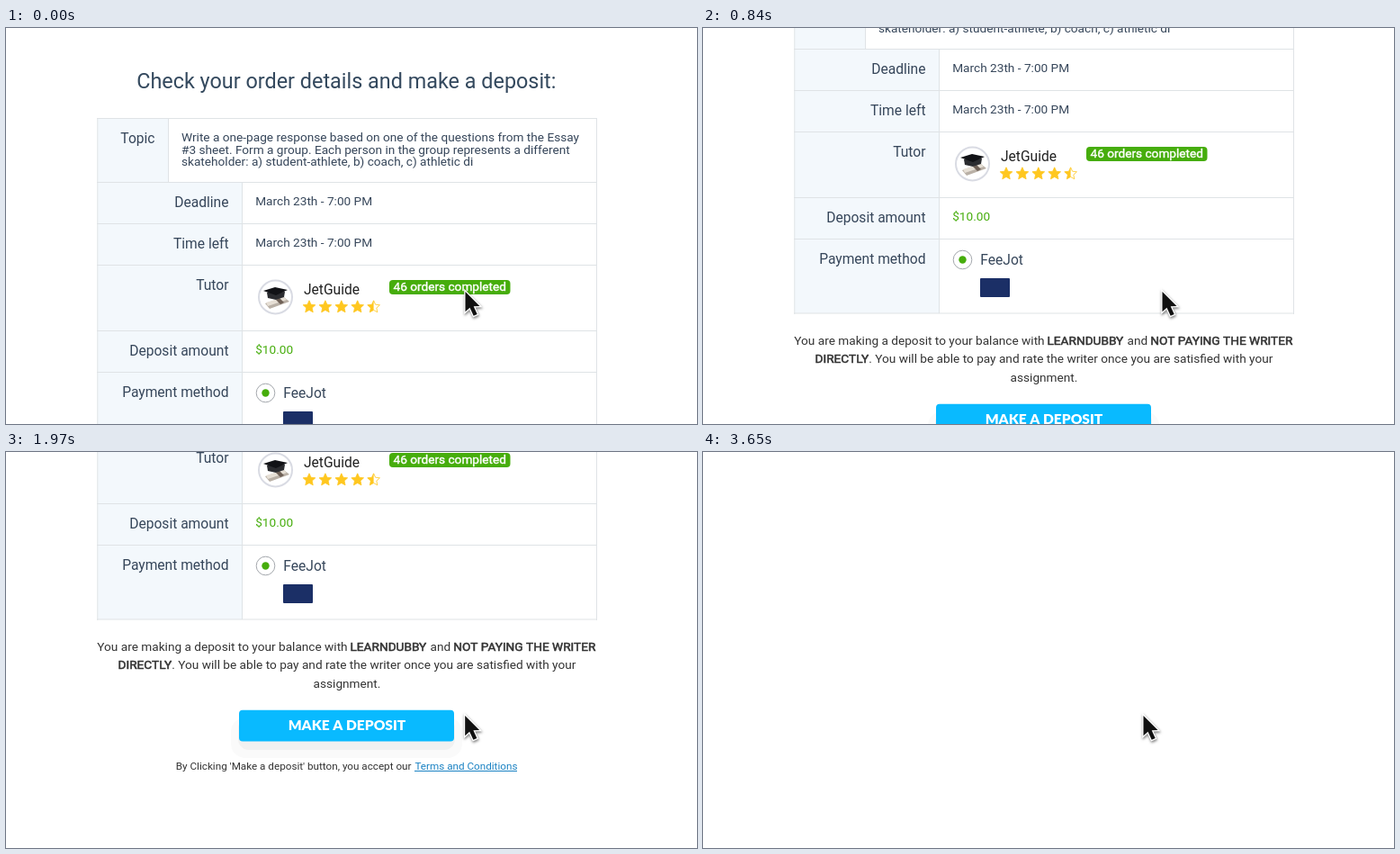
Recreate the animation shown at these times as an HTML page with a canvas. Size 768 px wide and 440 px high, loop 4.06 s.

```html
<!DOCTYPE html>
<html lang="en">
<head>
<meta charset="utf-8">
<title>Order deposit</title>
<style>
html, body { margin: 0; width: 100%; height: 100%; overflow: hidden; background: #fff; }
canvas { display: block; width: 768px; height: 440px; }
</style>
</head>
<body>
<canvas id="stage" width="768" height="440"></canvas>
<script>
const W = 768, H = 440, LOOP = 4060, TICK = 30, SCROLL = 279;
const ctx = document.getElementById('stage').getContext('2d');

const INK = '#36465a', DARK = '#333', GREEN = '#46ad0c', LINE = '#dfe3e6', CELL = '#f3f8fc';
// All page type is set on a 0.975 zoom.
const type = (px, family = 'Roboto', weight = 400) => `${weight} ${px * 0.975}px ${family}, sans-serif`;
const TITLE = type(24), LABEL = type(16), BODY = type(14), SMALL = type(12);
const BUTTON = type(16, 'Lato', 900), STEP = '400 30px Roboto, sans-serif';

// Progress 0..1 in n equal ticks, the first one taken at the start time.
function ramp(t, start, n) {
  const k = Math.floor((t - start) / TICK) + 1;
  return Math.max(0, Math.min(1, k / n));
}
const ease = p => p * p * (3 - 2 * p);

// Baselines sit on whole pixels.
function text(str, x, y, font, color, align = 'left', bold = 0) {
  y = Math.round(y);
  ctx.font = font;
  ctx.textAlign = align;
  ctx.fillStyle = color;
  ctx.fillText(str, x, y);
  if (bold) {
    ctx.strokeStyle = color;
    ctx.lineWidth = bold;
    ctx.lineJoin = 'round';
    ctx.strokeText(str, x, y);
  }
}

function box(x, y, w, h, color, r = 0) {
  ctx.fillStyle = color;
  ctx.beginPath();
  ctx.roundRect(x, y, w, h, r);
  ctx.fill();
}

function disc(x, y, r, fill, stroke, width) {
  ctx.beginPath();
  ctx.arc(x, y, r, 0, Math.PI * 2);
  if (fill) { ctx.fillStyle = fill; ctx.fill(); }
  if (stroke) { ctx.strokeStyle = stroke; ctx.lineWidth = width; ctx.stroke(); }
}

function trace(...pts) {
  ctx.beginPath();
  pts.forEach(([x, y]) => ctx.lineTo(x, y));
  ctx.closePath();
}

function poly(color, ...pts) {
  trace(...pts);
  ctx.fillStyle = color;
  ctx.fill();
}

function star(x, y, half) {
  const pts = [];
  for (let i = 0; i < 10; i++) {
    const r = i % 2 ? 3.4 : 7.2, a = i * Math.PI / 5 - Math.PI / 2;
    pts.push([x + r * Math.cos(a), y + r * Math.sin(a)]);
  }
  ctx.lineJoin = 'round';
  ctx.lineWidth = 0.8;
  ctx.strokeStyle = '#ffc71f';
  if (half) {
    ctx.save();
    ctx.beginPath();
    ctx.rect(x - 9, y - 9, 9, 18);
    ctx.clip();
    poly('#ffc71f', ...pts);
    ctx.restore();
    trace(...pts);
  } else {
    poly('#ffc71f', ...pts);
  }
  ctx.stroke();
}

function table() {
  box(102, 101, 78, 70, CELL);
  box(102, 172, 161, 293, CELL);
  for (const y of [100, 171, 217, 263, 336, 382, 464.6]) box(101, y, 556, 1, LINE);
  box(101.3, 100, 1, 366, LINE);
  box(656, 100, 1, 366, LINE);
  box(180, 100, 1, 71, LINE);
  box(262, 171, 1, 294, LINE);

  text('Topic', 165.5, 128, LABEL, INK, 'right');
  ['Write a one-page response based on one of the questions from the Essay',
   '#3 sheet. Form a group. Each person in the group represents a different',
   'skateholder: a) student-athlete, b) coach, c) athletic di']
    .forEach((s, i) => text(s, 195, 126 + i * 13.6, BODY, INK));

  const due = 'March 23th - 7:00 PM';
  [[171, 'Deadline', due], [217, 'Time left', due], [263, 'Tutor'],
   [336, 'Deposit amount', '$10.00', GREEN], [382, 'Payment method']]
    .forEach(([y, label, value = '', color = INK]) => {
      text(label, 247.5, y + 28, LABEL, INK, 'right');
      text(value, 277.2, y + 26, BODY, color);
    });
}

function avatar() {
  disc(299.5, 299, 18.5, '#fff', '#d9dbe3', 2);
  poly('#b9b0a6', [288, 306], [309, 299], [315, 304], [293, 312]);
  poly('#e6dfd5', [289, 305], [309, 299], [312, 302], [291, 309]);
  poly('#6f6157', [300, 302], [304, 300], [309, 305], [305, 307]);
  poly('#2b2c30', [290, 294], [310, 293], [309, 299], [300, 302], [291, 300]);
  poly('#111216', [286, 292], [299, 288], [313, 291], [300, 297]);
}

function tutor(alpha) {
  ctx.globalAlpha = alpha;
  avatar();
  text('JetGuide', 331, 296, LABEL, '#222');
  ctx.globalAlpha = 1;
  for (let i = 0; i < 5; i++) star(337 + i * 17.9, 310, i === 4);
  box(426, 280, 134.5, 16, GREEN, 4);
  text('46 orders completed', 430.5, 292, BODY, '#fff', 'left', 0.4);
}

function payment() {
  disc(288.5, 405.5, 10.3, '#fff', '#a3a7ac', 1);
  disc(288.5, 405.5, 4.2, GREEN);
  text('FeeJot', 308.3, 411, LABEL, INK);
  box(308, 426, 33, 21, '#1b2f66', 1);
}

function footer() {
  const y = 499.8, gap = 20.5;
  text('You are making a deposit to your balance with', 101.3, y, BODY, DARK);
  text('LEARNDUBBY', 382.5, y, BODY, DARK, 'left', 0.55);
  text('and', 471.5, y, BODY, DARK);
  text('NOT PAYING THE WRITER', 497.3, y, BODY, DARK, 'left', 0.55);
  text('DIRECTLY', 124.5, y + gap, BODY, DARK, 'left', 0.55);
  text('. You will be able to pay and rate the writer once you are satisfied with your',
    633.3, y + gap, BODY, DARK, 'right');
  text('assignment.', 379, y + 2 * gap, BODY, DARK, 'center');

  box(250, 574, 257, 45, '#fafafa', 16);
  box(258, 574, 241, 36, '#f1f1f1', 12);
  box(259, 565.7, 239, 34.8, '#09baff', 4);
  text('MAKE A DEPOSIT', 379, 588, BUTTON, '#fff', 'center');

  text("By Clicking 'Make a deposit' button, you accept our", 188.8, 632, SMALL, DARK);
  text('Terms and Conditions', 454.4, 632, SMALL, '#1a82c3');
  box(454, 633, 114, 1, '#1a82c3');
}

function cursor(x, y) {
  ctx.save();
  ctx.translate(x, y);
  trace([1, 2], [1, 24.3], [6, 19.8], [10.2, 28.8], [14.2, 27], [10.2, 18.3], [17, 18]);
  ctx.shadowColor = 'rgba(0,0,0,.55)';
  ctx.shadowBlur = 3;
  ctx.shadowOffsetY = 1.5;
  ctx.shadowOffsetX = 0.5;
  ctx.lineJoin = 'miter';
  ctx.lineWidth = 2.6;
  ctx.strokeStyle = '#fff';
  ctx.stroke();
  ctx.shadowColor = 'transparent';
  ctx.fillStyle = '#111';
  ctx.fill();
  ctx.restore();
}

function draw(t) {
  ctx.globalAlpha = 1;
  box(0, 0, W, H, '#fff');

  const pageAlpha = 1 - ramp(t, 2420, 15);
  if (pageAlpha > 0) {
    ctx.save();
    ctx.translate(0, -Math.round(SCROLL * ramp(t, 600, 17)));
    text('Check your order details and make a deposit:', 145.2, 67, TITLE, '#34495e');
    table();
    tutor(1 - ramp(t, 2300, 8));
    payment();
    footer();
    ctx.restore();
    ctx.globalAlpha = 1 - pageAlpha;
    box(0, 0, W, H, '#fff');
  }

  ctx.globalAlpha = ramp(t, 2930, 5) * (1 - ramp(t, 3560, 4));
  text('Step 5', 344.7, 234, STEP, '#111');
  ctx.globalAlpha = 1;

  cursor(509.5 - 21 * ease(ramp(t, 1970, 14)), 291);
}

const start = performance.now();
function tick() {
  draw((performance.now() - start) % LOOP);
  requestAnimationFrame(tick);
}
tick();
</script>
</body>
</html>
```
